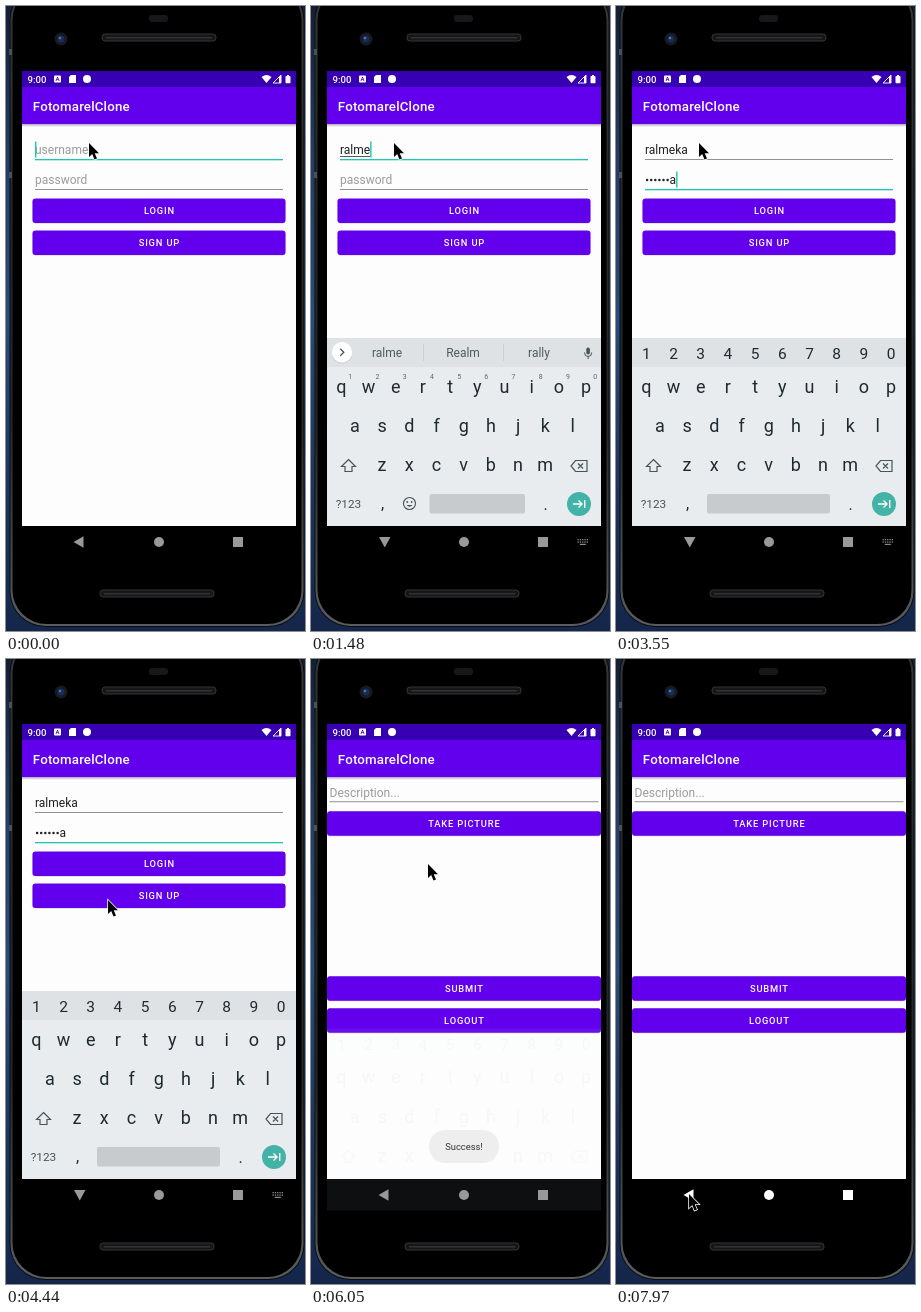
These frames come from a looping animation (299x625 px, 8 s). An HTML page with a canvas:

```html
<!DOCTYPE html>
<html lang="en">
<head>
<meta charset="utf-8">
<title>Phone login demo</title>
<style>
html, body { margin: 0; width: 100%; height: 100%; overflow: hidden; background: #000; }
canvas { display: block; }
</style>
</head>
<body>
<canvas id="stage" width="299" height="625"></canvas>
<script>
const ctx = document.getElementById('stage').getContext('2d');
const LOOP = 8000;
const TICK = 147.6;
const PURPLE = '#6200ee', TEAL = '#1fc4b4', INK = '#1d2a31', ICON = '#47545a';
const HINT = '#9b9b9b', DARK = '#202020';
const APP = 'FotomarelClone', USER = 'ralmeka', SUGGESTED = ['Realm', 'rally'];

// Moments of the story, in ticks.
const TYPE = 5, SECRET = 14, SECRET_TYPE = 18, MOVE = 27, MASK = 34, TAP = 35, OPEN = 39;

// Pointer stops: tick, x, y.
const STOPS = [[26, 83, 137], [30, 102, 241], [32, 144, 236], [34, 117, 205],
  [41, 117, 205], [46, 111, 553], [49, 73, 535]];

const clamp = (v, lo, hi) => Math.min(hi, Math.max(lo, v));
const ramp = (k, from, to) => clamp((k - from) / (to - from), 0, 1);
const smooth = p => p * p * (3 - 2 * p);

const typedCount = k => k < TYPE + 5 ? clamp(k - TYPE + 1, 0, 4) : k < TYPE + 7 ? 5 : USER.length;
const secretCount = k => clamp(k - SECRET_TYPE + 1, 0, USER.length);
const caretVisible = k => k < MOVE || Math.floor((k - MOVE) / 4) % 2 === 1;

function pointerAt(k) {
  let [, x, y] = STOPS[0];
  for (let i = 1; i < STOPS.length; i++) {
    const p = smooth(ramp(k, STOPS[i - 1][0], STOPS[i][0]));
    x += (STOPS[i][1] - STOPS[i - 1][1]) * p;
    y += (STOPS[i][2] - STOPS[i - 1][2]) * p;
  }
  return [x, y];
}

function text(str, x, y, size, color, { weight = 400, align = 'left', spacing = 0 } = {}) {
  ctx.font = `${weight} ${size}px Roboto, sans-serif`;
  ctx.letterSpacing = spacing + 'px';
  ctx.textAlign = align;
  ctx.fillStyle = color;
  ctx.fillText(str, x, y);
}
function rect(x, y, w, h, color) {
  ctx.fillStyle = color;
  ctx.fillRect(x, y, w, h);
}
function round(x, y, w, h, r, fill, stroke) {
  ctx.beginPath();
  ctx.roundRect(x, y, w, h, r);
  ctx.fillStyle = fill;
  ctx.fill();
  if (stroke) { ctx.strokeStyle = stroke; ctx.lineWidth = 1; ctx.stroke(); }
}
function disc(x, y, r, color) {
  ctx.beginPath();
  ctx.arc(x, y, r, 0, Math.PI * 2);
  ctx.fillStyle = color;
  ctx.fill();
}
function shape(d, fill, stroke, width = 1) {
  const path = new Path2D(d);
  if (stroke) { ctx.strokeStyle = stroke; ctx.lineWidth = width; ctx.stroke(path); }
  if (fill) { ctx.fillStyle = fill; ctx.fill(path); }
}
function layer(alpha, draw, dy = 0) {
  if (alpha <= 0) return;
  ctx.save();
  ctx.globalAlpha = alpha;
  ctx.translate(0, dy);
  draw();
  ctx.restore();
}
function vertical(from, to, ...colors) {
  const g = ctx.createLinearGradient(0, from, 0, to);
  colors.forEach((c, i) => g.addColorStop(i / (colors.length - 1), c));
  return g;
}

function phone() {
  rect(0, 0, 299, 625, vertical(0, 625, '#141f36', '#233f68', '#284c7c', '#1c3761', '#14264a'));
  round(3.5, -22, 295, 643, 36, '#0b0c0d');
  round(4.5, -21, 293, 641, 35, vertical(0, 625, '#34373a', '#25282a', '#25282a', '#5a5e61'));
  round(6.5, -20, 289, 638, 34, '#000');
  for (const y of [43, 166]) rect(3, y, 3, 6, '#4a5157');
  round(143, 9, 19, 7, 3, '#17181a');
  disc(55, 33, 6.5, '#171a20');
  disc(55, 33, 3.5, '#182c55');
  disc(54, 32, 1.3, '#4c74b8');
  for (const [x, y] of [[96, 28], [94, 584]]) {
    round(x, y, 114, 7, 3, '#161717', '#333536');
    rect(x + 4, y + 3, 106, 1.5, '#303233');
  }
}

function bars() {
  rect(16, 65, 274, 16, '#3700b3');
  text('9:00', 21.5, 76.7, 9.6, '#fff', { weight: 500 });
  round(48, 69.5, 7, 7, 1, '#fff');
  text('A', 51.5, 75.3, 6, '#3700b3', { weight: 700, align: 'center' });
  shape('M65 69 h5 v8 h-7 v-6z', '#fff');
  disc(81, 73, 4, '#fff');
  shape('M255.5 71 Q260.5 67 265.5 71 L260.5 77z', '#fff');
  shape('M275 69 v8 h-8z', null, '#fff', 0.9);
  shape('M275 69 v8 h-2 v-6z', '#fff');
  round(279.5, 70, 5, 7.3, 0.7, '#fff');
  rect(281, 69, 2, 1, '#fff');
  rect(16, 81, 274, 37, PURPLE);
  text(APP, 26.8, 104.7, 13.3, '#fff', { weight: 500, spacing: 0.17 });
}

function page() {
  rect(16, 118, 274, 402, '#fdfdfd');
  rect(16, 118, 274, 3, vertical(118, 121, '#b4aabf', '#fdfdfd'));
}

function button(label, x, y, w) {
  round(x, y + 0.5, w, 24.5, 3, 'rgba(0,0,0,.2)');
  round(x, y, w, 24.5, 3, PURPLE);
  text(label, 153.4, y + 15.8, 9.33, '#fff', { weight: 500, align: 'center', spacing: 0.83 });
}

function underline(x, y, w, focused) {
  rect(x, y, w, focused ? 1.3 : 0.9, focused ? TEAL : '#858585');
}

function secretField(k) {
  const count = secretCount(k);
  if (!count) {
    text('password', 29, 178.3, 12, HINT);
    return 29;
  }
  const dots = k >= MASK ? count : count - 1;
  const end = 29 + dots * 4.1;
  for (let i = 0; i < dots; i++) disc(31.1 + 4.1 * i, 174, 1.25, DARK);
  if (dots === count) return end;
  text(USER[dots], end, 178.3, 12, DARK);
  return end + ctx.measureText(USER[dots]).width;
}

function nameField(k) {
  const name = USER.slice(0, typedCount(k));
  text(name || 'username', 29, 148.3, 12, name ? DARK : HINT);
  const width = name ? ctx.measureText(name).width : 0;
  if (k < SECRET) rect(29, 150, width, 0.8, '#333');
  return 29 + width;
}

function loginScreen(k) {
  const onSecret = k >= SECRET;
  page();
  underline(29, 153, 248, !onSecret);
  underline(29, 183, 248, onSecret);
  const nameEnd = nameField(k), secretEnd = secretField(k);
  if (caretVisible(k)) rect(onSecret ? secretEnd : nameEnd, onSecret ? 165.5 : 135.5, 1.4, 16, TEAL);

  button('LOGIN', 26.5, 192.5, 253);
  if (k >= TAP && k < TAP + 2) {
    ctx.save();
    ctx.beginPath();
    ctx.roundRect(26.5, 192.5, 253, 24.5, 3);
    ctx.clip();
    disc(117, 205, 85 * (k - TAP + 1), 'rgba(255,255,255,.24)');
    ctx.restore();
  }
  button('SIGN UP', 26.5, 224.5, 253);
}

function homeScreen() {
  page();
  text('Description...', 18.5, 137.8, 12, HINT);
  underline(18.5, 142.3, 269, false);
  button('TAKE PICTURE', 16, 152.2, 274);
  button('SUBMIT', 16, 317.2, 274);
  button('LOGOUT', 16, 349.2, 274);
}

function keyRow(keys, x, y, size, color = INK) {
  [...keys].forEach((key, i) => text(key, x + 27.2 * i, y, size, color, { align: 'center' }));
}

function suggestions(k) {
  const n = typedCount(k);
  disc(31, 347, 10.5, 'rgba(0,0,0,.08)');
  disc(31, 346.3, 10.2, '#fff');
  shape('M29.3 342.8 l3.5 3.5 l-3.5 3.5', null, ICON, 1.3);
  round(275.3, 341.5, 3.6, 7, 1.8, ICON);
  shape('M273.5 346.5 q0 4 3.6 4 q3.6 0 3.6 -4 M277.1 350.5 v2.5', null, ICON);
  if (!n) return;
  [USER, ...SUGGESTED].forEach((word, i) =>
    text(word.slice(0, n), 76 + 76 * i, 351.3, 12, '#505b60', { align: 'center' }));
  for (const x of [112, 192]) rect(x, 338, 1, 17, '#cbd0d2');
}

function smiley(x, y) {
  ctx.beginPath();
  ctx.arc(x, y, 6, 0, Math.PI * 2);
  ctx.strokeStyle = ICON;
  ctx.lineWidth = 1.1;
  ctx.stroke();
  for (const side of [-1, 1]) disc(x + 2.2 * side, y - 1.5, 0.9, ICON);
  shape(`M${x - 3} ${y + 1.5} q3 3.5 6 0z`, ICON);
}

function keyboard(k) {
  const forSecret = k >= SECRET;
  rect(16, 332, 274, 188, '#e8ecef');
  rect(16, 332, 274, 29, '#dee2e5');
  if (forSecret) {
    keyRow('1234567890', 30.3, 352.8, 15.5);
  } else {
    suggestions(k);
    keyRow('1234567890', 39.3, 373.3, 7, '#5d686d');
    smiley(98.5, 497.5);
  }
  keyRow('qwertyuiop', 30.3, 386.5, 18);
  keyRow('asdfghjkl', 44, 425.8, 18);
  keyRow('zxcvbnm', 71, 465.2, 18);

  shape('M37.5 453.5 l7 7 h-3.5 v5 h-7 v-5 h-3.5z', null, ICON, 1.2);
  shape('M264.5 454.5 h11.5 v11 h-11.5 l-4.5 -5.5z M267 457.5 l5 5 m0 -5 l-5 5', null, ICON, 1.2);
  text('?123', 37.5, 502, 11.8, ICON, { align: 'center' });
  text(',', 71.5, 502.5, 16, INK, { align: 'center' });
  text('.', 234.5, 503.5, 16, INK, { align: 'center' });
  const left = forSecret ? 91 : 118.5;
  round(left, 488, 214 - left, 19.5, 2, '#c7cbce');
  disc(268, 498, 12, '#43b2a7');
  shape('M262 498 h9 m-3.5 -3.5 l3.5 3.5 l-3.5 3.5 M273.7 494 v8', null, '#fff', 1.4);
}

function navigation(k) {
  const shade = 153 + 102 * ramp(k, 50, 54);
  const color = `rgb(${shade},${shade},${shade})`;
  const typing = k >= 1 && k <= OPEN;
  rect(16, 520, 274, 31.5, k > OPEN && k < OPEN + 3 ? '#0d0f11' : '#000');
  shape(typing ? 'M68 531 h11.5 l-5.75 10.5z' : 'M67.5 536 l10 -5.7 v11.4z', color);
  disc(153, 536, 5, color);
  rect(227, 531, 10, 10, color);
  if (!typing) return;
  for (let i = 0; i < 10; i++) {
    rect(266.5 + 2.3 * (i % 5), i < 5 ? 533 : 535.4, 1.3, 1.3, '#8b8b8b');
  }
  rect(268.8, 537.8, 6, 1.2, '#8b8b8b');
}

function toast() {
  round(118, 471, 70, 33, 16.5, '#eeeeee');
  text('Success!', 153, 491, 9.33, '#333', { align: 'center' });
}

function cursor([x, y]) {
  ctx.save();
  ctx.translate(x, y);
  shape('M0 0 V14 L3.2 11 L5.5 16.5 L8 15.5 L5.7 10.2 H10z', '#000', '#fff', 1.5);
  ctx.restore();
}

function draw(k) {
  const rise = ramp(k, 0, 3), fall = ramp(k, OPEN, OPEN + 2.06);
  const home = ramp(k, OPEN, OPEN + 2);
  phone();
  bars();
  ctx.save();
  ctx.beginPath();
  ctx.rect(16, 118, 274, 402);
  ctx.clip();
  if (home < 1) loginScreen(k);
  layer(home, homeScreen);
  layer(rise - fall, () => keyboard(k), 120 * (1 - rise) ** 2 + 40 * fall ** 2);
  ctx.restore();
  navigation(k);
  layer(home - ramp(k, 43, 46), toast);
  cursor(pointerAt(k));
}

const start = performance.now();
function tick() {
  const t = (performance.now() - start) % LOOP;
  draw(Math.floor((t + 1) / TICK));
  requestAnimationFrame(tick);
}
tick();
</script>
</body>
</html>
```
